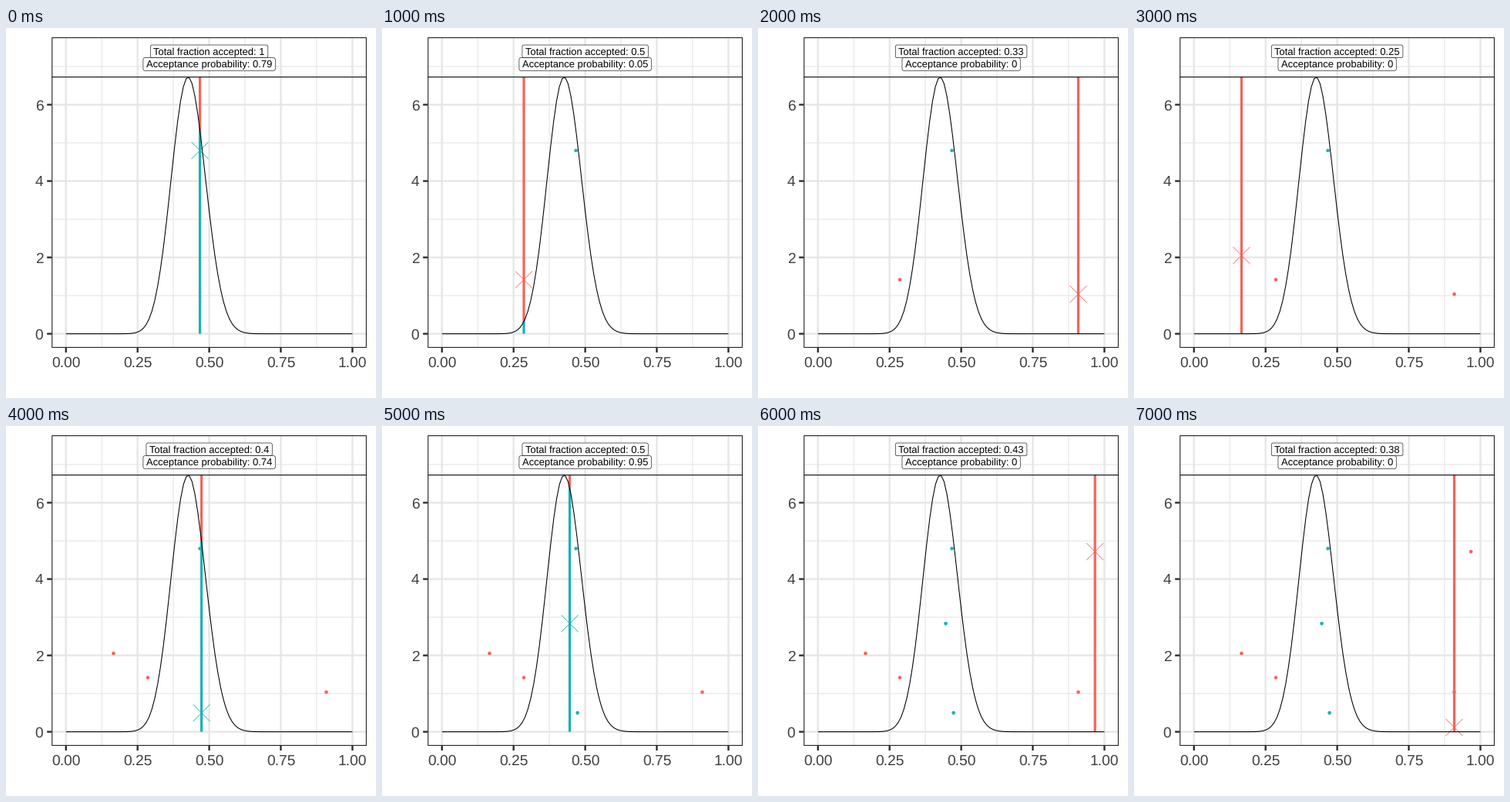
Write a matplotlib script that moves like this. It is 480 by 480 pixels and loops after 8000 ms.

```python
import math

import matplotlib.pyplot as plt
import numpy as np
from matplotlib.animation import FuncAnimation
from matplotlib.patches import Circle, FancyBboxPatch, Rectangle

plt.rcParams["font.family"] = "Liberation Sans"
plt.rcParams["path.snap"] = False
plt.rcParams["text.hinting"] = "none"

SIZE = 480
LEFT, RIGHT, TOP, BOTTOM = 59.2, 468, 12, 415
RED, TEAL = "#F6625B", "#17B2B7"
GRID, FRAME, AXIS_TEXT = "#E6E6E6", "#2A2A2A", "#404040"
A, B = 30, 40

# proposals: position and uniform height under the envelope
SAMPLES = [(0.4677, 4.80), (0.2858, 1.417), (0.9087, 1.038), (0.166, 2.053),
           (0.4732, 0.495), (0.446, 2.835), (0.967, 4.718), (0.9087, 0.115)]


def density(x):
    x = np.asarray(x, dtype=float)
    norm = math.gamma(A + B) / (math.gamma(A) * math.gamma(B))
    return norm * x ** (A - 1) * (1 - x) ** (B - 1)


PEAK = float(density((A - 1) / (A + B - 2)))
X_UNIT = (RIGHT - LEFT) / 1.1
Y_UNIT = (BOTTOM - TOP) / 1.1 / (1.1 * PEAK)


def px(x):
    return LEFT + X_UNIT * (0.05 + x)


def py(y):
    return BOTTOM - (BOTTOM - TOP) / 22 - Y_UNIT * y


fig = plt.figure(figsize=(SIZE / 72, SIZE / 72), dpi=72, facecolor="white")
ax = fig.add_axes([0, 0, 1, 1])
ax.set_xlim(0, SIZE)
ax.set_ylim(SIZE, 0)
ax.axis("off")


def line(xs, ys, color, width, z):
    return ax.plot(xs, ys, color=color, lw=width, zorder=z,
                   solid_capstyle="butt", solid_joinstyle="round")[0]


def draw_panel():
    for y in (1, 3, 5, 7):
        line([LEFT, RIGHT], [py(y)] * 2, GRID, 1.17, 0)
    for x in (0.125, 0.375, 0.625, 0.875):
        line([px(x)] * 2, [TOP, BOTTOM], GRID, 1.17, 0)
    for y in (0, 2, 4, 6):
        line([LEFT, RIGHT], [py(y)] * 2, GRID, 2.33, 0)
        line([LEFT - 6, LEFT], [py(y)] * 2, FRAME, 2.33, 1)
        ax.text(48.4, py(y) + 6.9, str(y), size=19.2, color=AXIS_TEXT,
                ha="right", va="baseline")
    for x in (0, 0.25, 0.5, 0.75, 1):
        line([px(x)] * 2, [TOP, BOTTOM], GRID, 2.33, 0)
        line([px(x)] * 2, [BOTTOM, BOTTOM + 6], FRAME, 2.33, 1)
        ax.text(px(x), 440.2, f"{x:.2f}", size=19.2, color=AXIS_TEXT,
                ha="center", va="baseline")
    ax.add_patch(Rectangle((LEFT + 0.58, TOP + 0.58), RIGHT - LEFT - 1.17,
                           BOTTOM - TOP - 1.17, fill=False, ec=FRAME,
                           lw=1.17, zorder=6))
    grid = np.linspace(0, 1, 101)
    line(px(grid), py(density(grid)), "black", 1.07, 4)
    line([LEFT, RIGHT], [py(PEAK)] * 2, "black", 1.07, 4)


class Label:
    """Centred text in a rounded box that fits its width."""
    height = 16.6

    def __init__(self, y, z):
        self.y = y
        self.text = ax.text(px(0.5), y + 4.65, "", size=13, color="black",
                            ha="center", va="baseline", zorder=z + 0.5)
        self.box = FancyBboxPatch(
            (0, 0), 1, 1, boxstyle="round,pad=0,rounding_size=2.2",
            fc="white", ec="black", lw=0.6, zorder=z)
        ax.add_patch(self.box)

    def show(self, string):
        self.text.set_text(string)
        extent = self.text.get_window_extent()
        width = abs(extent.transformed(ax.transData.inverted()).width) + 8
        self.box.set_bounds(px(0.5) - width / 2, self.y - self.height / 2,
                            width, self.height)


draw_panel()
accepted = [y < density(x) for x, y in SAMPLES]
colors = [TEAL if ok else RED for ok in accepted]
dots = [ax.add_patch(Circle((px(x), py(y)), 2.3, fc=c, ec="none", zorder=3))
        for (x, y), c in zip(SAMPLES, colors)]
upper = line([], [], RED, 3.2, 2)
lower = line([], [], TEAL, 3.2, 2)
cross = line([], [], RED, 0.71, 3)
total_label = Label(py(1.1 * PEAK), 7)
prob_label = Label(py(1.05 * PEAK), 8)
ARM = np.array([-11, 11, np.nan, -11, 11])
RISE = np.array([-11, 11, np.nan, 11, -11])


def update(i):
    x, y = SAMPLES[i]
    height = float(density(x))
    upper.set_data([px(x)] * 2, [py(PEAK), py(height)])
    lower.set_data([px(x)] * 2, [py(height), py(0)])
    cross.set_data(px(x) + ARM, py(y) + RISE)
    cross.set_color(colors[i])
    for k, dot in enumerate(dots):
        dot.set_visible(k < i)
    fraction = sum(accepted[:i + 1]) / (i + 1)
    total_label.show(f"Total fraction accepted: {round(fraction, 2):g}")
    prob_label.show(f"Acceptance probability: {round(height / PEAK, 2):g}")
    return []


anim = FuncAnimation(fig, update, frames=len(SAMPLES), interval=1000,
                     init_func=lambda: update(0), repeat=True)
plt.show()
```
